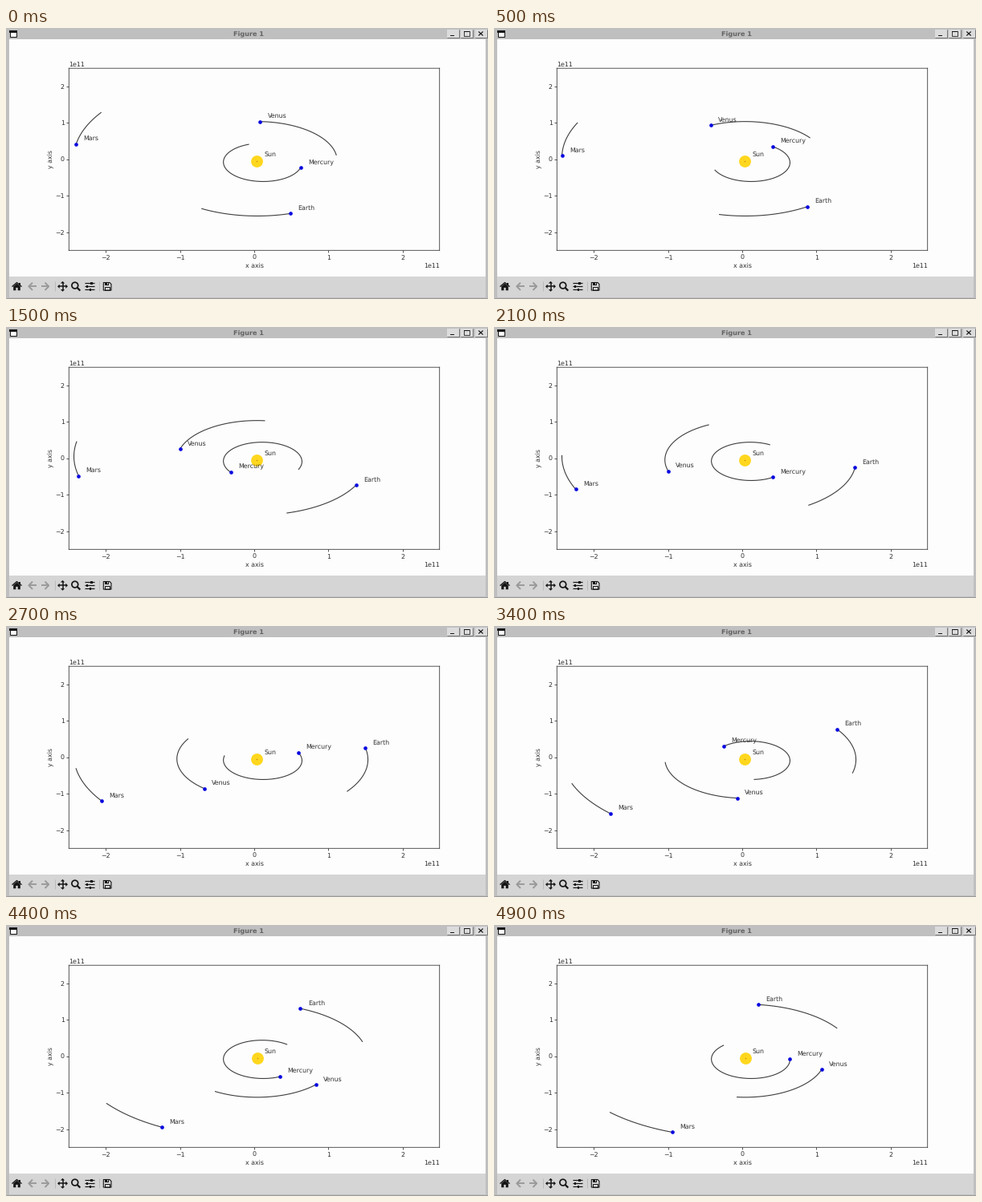
A matplotlib script for the animation above (5 s loop, 600 by 338 pixels).

```python
import numpy as np
import matplotlib.pyplot as plt
from matplotlib.animation import FuncAnimation
from matplotlib.patches import Circle, Polygon, Rectangle

W, H, DPI = 600, 338, 100
PT = 72 / DPI  # points per pixel
FRAMES, INTERVAL = 50, 100
TRAIL_DAYS = 49
UNIT = 1e11
FRAME_GREY, BAR_GREY, CANVAS = "#bfbfbf", "#d5d5d5", "#fdfdfd"
DIM, INK, SOFT = "#999999", "#151515", "#303030"

plt.rcParams.update({
    "font.family": "DejaVu Sans", "font.size": 7.9 * PT,
    "text.hinting": "none", "text.color": SOFT,
    "axes.labelcolor": SOFT, "axes.edgecolor": SOFT,
    "xtick.color": SOFT, "ytick.color": SOFT,
    "axes.linewidth": 0.8 * PT, "axes.labelpad": 2.5 * PT,
    "xtick.major.size": 2.8 * PT, "ytick.major.size": 2.8 * PT,
    "xtick.major.pad": 2.6 * PT, "ytick.major.pad": 2.8 * PT,
    "xtick.major.width": 0.8 * PT, "ytick.major.width": 0.8 * PT,
})

fig = plt.figure(figsize=(W / DPI, H / DPI), dpi=DPI, facecolor=FRAME_GREY)
win = fig.add_axes([0, 0, 1, 1])
win.set(xlim=(0, W), ylim=(H, 0))
win.axis("off")


def rect(x, y, w, h, color, edge="none", lw=0):
    win.add_patch(Rectangle((x, y), w, h, fc=color, ec=edge, lw=lw * PT))


def line(xs, ys, color=INK, lw=1.0):
    win.plot(xs, ys, color=color, lw=lw * PT, solid_capstyle="butt")


def poly(points, color=INK):
    win.add_patch(Polygon(points, fc=color, ec="none"))


def title_bar():
    win.text(301.8, 9, "Figure 1", weight="bold", size=8.1 * PT,
             color="#636363", ha="center", va="baseline")
    rect(4.5, 3.5, 8.5, 7, "white", INK, 1)
    rect(4, 3, 9.5, 3, INK)
    for x in (548.5, 565.5, 583.5):
        rect(x, 2, 15, 10, "#dcdcdc")
        line([x, x + 15, x + 15], [12, 12, 2], "#777777", 1)
    rect(553, 8.6, 5, 1.4, INK)
    rect(569.5, 4.2, 7, 5.6, "none", INK, 0.8)
    rect(569.5, 4, 7, 1.4, INK)
    for ys in ([4.5, 9.5], [9.5, 4.5]):
        line([588.3, 593.7], ys, INK, 1.2)


def arrow(x, y, side):
    line([x - 5 * side, x + 4 * side], [y, y], DIM, 1.9)
    line([x, x + 4.7 * side, x], [y - 4.7, y, y + 4.7], DIM, 1.9)


def toolbar(y=322.3):
    poly([(9.2, y), (13.5, y - 3.7), (17.8, y), (17.8, y + 5), (14.7, y + 5),
          (14.7, y + 1.6), (12.3, y + 1.6), (12.3, y + 5), (9.2, y + 5)])
    line([7.5, 13.5, 19.5], [y + 0.3, y - 4.8, y + 0.3], INK, 1.3)
    rect(16.2, y - 4.6, 1.5, 3, INK)
    arrow(33, y, -1)
    arrow(48.5, y, 1)
    for x in (60.5, 115.5):
        line([x, x], [y - 6, y + 6], "#b4b4b4", 0.8)
    # pan cross
    cx = 70.5
    line([cx - 5, cx + 5], [y, y], INK, 1.5)
    line([cx, cx], [y - 5, y + 5], INK, 1.5)
    for dx, dy in ((1, 0), (-1, 0), (0, 1), (0, -1)):
        poly([(cx + 6.5 * dx, y + 6.5 * dy),
              (cx + 3.8 * dx + 2.6 * dy, y + 3.8 * dy + 2.6 * dx),
              (cx + 3.8 * dx - 2.6 * dy, y + 3.8 * dy - 2.6 * dx)])
    # magnifier
    win.add_patch(Circle((85.8, y - 1.2), 3.9, fc="none", ec=INK, lw=1.7 * PT))
    line([88.6, 92.3], [y + 1.6, y + 5.3], INK, 2.2)
    # sliders
    for dy, knob in ((-4, 106.5), (0, 101), (4, 105)):
        line([98, 110], [y + dy, y + dy], INK, 1.2)
        rect(knob - 1.2, y + dy - 1.5, 2.4, 3, INK)
    # floppy disk
    win.add_patch(Polygon([(121.3, y - 4.8), (129, y - 4.8), (131, y - 2.8),
                           (131, y + 4.8), (121.3, y + 4.8)],
                          fc=BAR_GREY, ec=INK, lw=1.1 * PT))
    rect(123.3, y + 0.8, 5.7, 3.9, "none", INK, 1)
    rect(123.3, y - 4.6, 4.6, 3.2, INK)
    rect(125.9, y - 4, 1.1, 2, BAR_GREY)


rect(3.5, 14, 593, 296, CANVAS)
rect(3.5, 310, 593, 26, BAR_GREY)
line([0, W], [337.3, 337.3], "#9a9a9a", 1)
title_bar()
toolbar()

ax = fig.add_axes([78.3 / W, 1 - 277.3 / H, 461.4 / W, 227.1 / H],
                  facecolor=CANVAS)
ax.set(xlim=(-2.5 * UNIT, 2.5 * UNIT), ylim=(-2.5 * UNIT, 2.5 * UNIT),
       xlabel="x axis", ylabel="y axis")
ax.set_xticks(np.arange(-2, 3) * UNIT)
ax.set_yticks(np.arange(-2, 3) * UNIT)
for axis in (ax.xaxis, ax.yaxis):
    axis.OFFSETTEXTPAD = 2.2 * PT
for spine in ax.spines.values():
    spine.set_snap(False)


class Body:
    """Kepler ellipse: centre, semi-axis, eccentricity, perihelion, phase, deg/day."""

    def __init__(self, name, centre, a, e, peri, phase, rate):
        self.centre, self.a, self.e = np.array(centre), a, e
        self.peri, self.phase, self.rate = np.radians([peri, phase, rate])
        self.trail, = ax.plot([], [], color="#3c3c3c", lw=1.1 * PT, zorder=2)
        self.dot, = ax.plot([], [], "o", color="#0a0ae0", ms=4.7 * PT,
                            mew=0, snap=False, zorder=4)
        self.label = ax.text(0, 0, name, zorder=5)

    def position(self, day):
        mean = self.phase + self.rate * np.asarray(day, float)
        ecc = mean.copy()
        for _ in range(12):
            ecc = mean + self.e * np.sin(ecc)
        u = self.a * np.cos(ecc)
        v = self.a * np.sqrt(1 - self.e ** 2) * np.sin(ecc)
        c, s = np.cos(self.peri), np.sin(self.peri)
        return (UNIT * (self.centre[0] + c * u - s * v),
                UNIT * (self.centre[1] + s * u + c * v))

    def show(self, day):
        x, y = self.position(np.arange(day - TRAIL_DAYS, day + 1))
        self.trail.set_data(x, y)
        self.dot.set_data(x[-1:], y[-1:])
        self.label.set_position((x[-1] + 0.1 * UNIT, y[-1] + 0.1 * UNIT))


bodies = [
    Body("Mercury", (0.114, -0.084), 0.532, 0.170, 150, -163.9, 4.68),
    Body("Venus", (0.038, -0.044), 1.081, 0.0068, 131, -42.9, 1.614),
    Body("Earth", (0.041, -0.064), 1.493, 0.0167, 103, -175.4, 0.986),
    Body("Mars", (-0.155, 0.043), 2.279, 0.0934, 336, -164.05, 0.526),
]
sun, = ax.plot([], [], "o", color="#ffd71e", ms=14.8 * PT, mew=0,
               snap=False, zorder=3)
core, = ax.plot([], [], "o", color="#c08a10", ms=1.5 * PT, mew=0,
                snap=False, zorder=3)
sun_label = ax.text(0, 0, "Sun", zorder=5)


def day_at(frame):
    """Whole simulated days; the pace wavers slightly."""
    return int(round(np.interp(frame, [0, 5, 15, 27, 34, 44, 49],
                               [0, 17, 47, 87, 109, 142, 158])))


def update(frame):
    day = day_at(frame)
    for body in bodies:
        body.show(day)
    x, y = (0.033 + 4e-5 * day) * UNIT, -0.044 * UNIT
    for marker in (sun, core):
        marker.set_data([x], [y])
    sun_label.set_position((x + 0.1 * UNIT, y + 0.1 * UNIT))
    return []


anim = FuncAnimation(fig, update, frames=FRAMES, interval=INTERVAL,
                     repeat=True, repeat_delay=0, blit=False)
plt.show()
```
